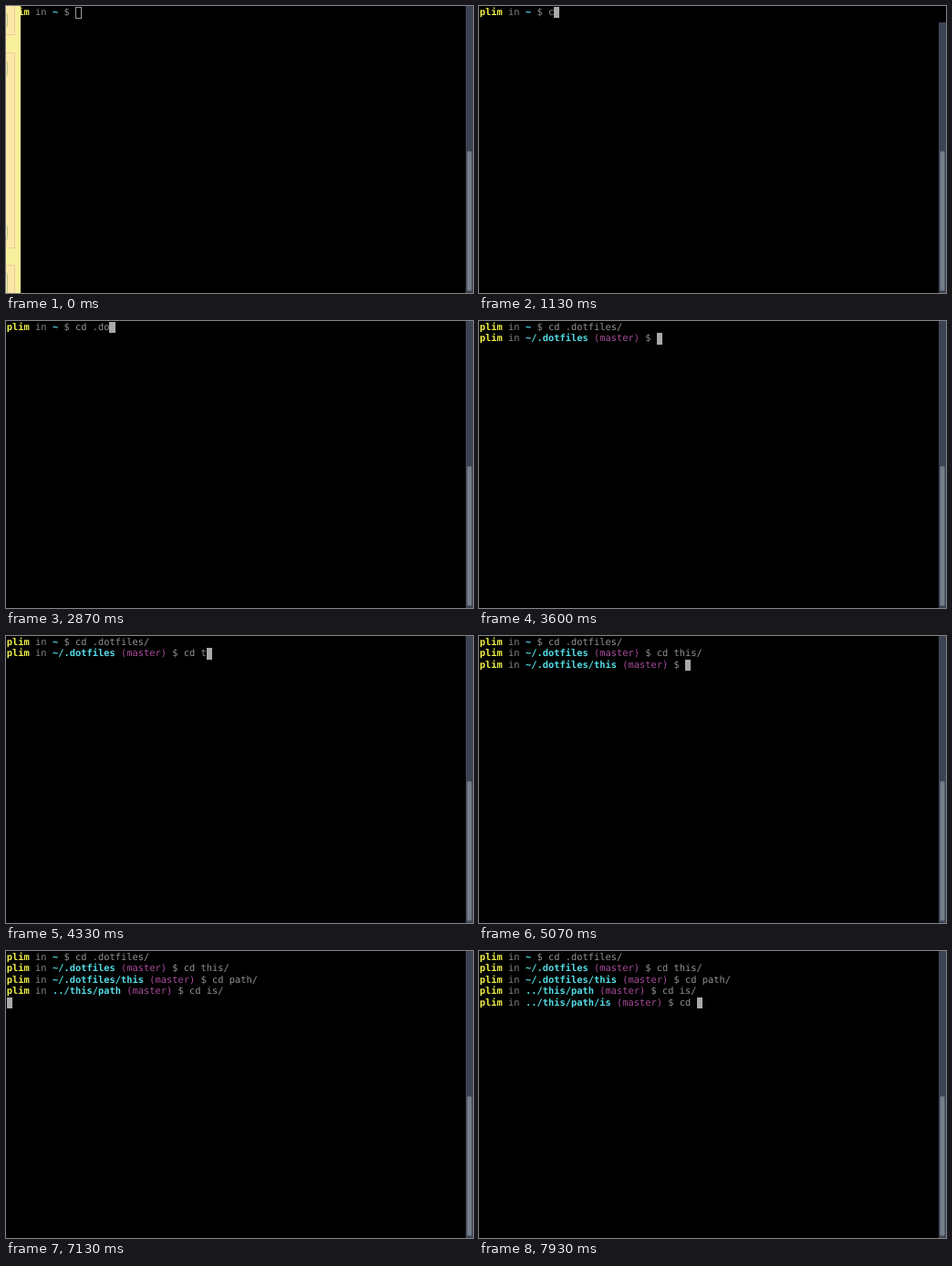
Write an HTML page that moves like this. It is 512 px wide and 315 px high and loops after 8000 ms.

```html
<!DOCTYPE html>
<html lang="en">
<head>
<meta charset="utf-8">
<title>Terminal prompt</title>
<style>
  html, body { margin: 0; width: 100%; height: 100%; overflow: hidden; background: #000; }
  #stage { position: absolute; left: 0; top: 0; width: 512px; height: 315px; overflow: hidden; background: #000; }
  #screen {
    position: absolute; left: 0.8px; top: 0.8px; margin: 0; color: #929292;
    font: 10.4px/12.55px "DejaVu Sans Mono", monospace;
    text-rendering: geometricPrecision; white-space: pre;
  }
  .row { height: 12.55px; }
  .user { color: #f0f048; font-weight: bold; }
  .in { color: #858585; }
  .path { color: #54dce6; font-weight: bold; }
  .branch { color: #aa4c9c; }
  .cursor {
    display: inline-block; box-sizing: border-box; width: 1ch; height: 12.4px;
    vertical-align: top; background: #aaa;
  }
  .unfocused .cursor { width: 7.3px; height: 13px; background: none; border: 1px solid #999; }

  #bar { position: absolute; left: 504px; top: 0; width: 8px; height: 315px; background: #3c4352; }
  #thumb {
    position: absolute; left: 1px; top: 159px; width: 6px; height: 154px; box-sizing: border-box;
    border: 1px solid #59616d; border-radius: 2px; background: #757f8c;
  }
  #shade { position: absolute; left: 470px; top: 0; width: 42px; height: 18px; background: #000; }

  #page { position: absolute; left: 0; top: 0; width: 16px; height: 315px; overflow: hidden; background: #f7f09c; }
  #page div { position: absolute; left: -20px; box-sizing: border-box; }
  .panel { width: 30px; background: #fbe8a6; border: 1px solid #f4c89c; }
  .field { width: 22px; background: #f4eba4; border: 1px solid #bcc28c; border-radius: 3px; }
</style>
</head>
<body>
<div id="stage">
  <div id="screen"></div>
  <div id="bar"><div id="thumb"></div></div>
  <div id="shade"></div>
  <div id="page">
    <div class="panel" style="top:-5px;height:37px"></div>
    <div class="panel" style="top:51px;height:215px"></div>
    <div class="panel" style="top:284px;height:40px"></div>
    <div class="field" style="top:7px;height:17px"></div>
    <div class="field" style="top:60px;height:17px"></div>
    <div class="field" style="top:240px;height:17px"></div>
    <div class="field" style="top:292px;height:30px"></div>
  </div>
</div>
<script>
const LOOP = 8000, FOCUS = 670, SHADE = [930, 2070];

// Each line: when it opens, when its prompt is printed, and the keys typed after it.
const lines = [
  { open: 0, prompt: 0, path: '~',
    keys: [[930, 'c'], [1730, 'd'], [2000, ' '], [2330, '.'], [2670, 'd'], [2870, 'o'], [3200, 'tfiles/']] },
  { open: 3470, prompt: 3540, path: '~/.dotfiles', branch: 'master',
    keys: [[3870, 'c'], [4000, 'd'], [4130, ' '], [4330, 't'], [4470, 'h'], [4670, 'is/']] },
  { open: 5000, prompt: 5065, path: '~/.dotfiles/this', branch: 'master',
    keys: [[5270, 'c'], [5330, 'd'], [5470, ' '], [5600, 'p'], [5670, 'a'], [5790, 'th/']] },
  { open: 5930, prompt: 6000, path: '../this/path', branch: 'master',
    keys: [[6270, 'c'], [6330, 'd'], [6470, ' '], [6600, 'i'], [6730, 's'], [6870, '/']] },
  { open: 7070, prompt: 7135, path: '../this/path/is', branch: 'master',
    keys: [[7540, 'c'], [7670, 'd'], [7800, ' ']] },
];

const byId = id => document.getElementById(id);
const span = (name, text = '') => `<span class="${name}">${text}</span>`;

function promptOf({ path, branch }) {
  const git = branch ? span('branch', `(${branch})`) + ' ' : '';
  return `${span('user', 'plim')} ${span('in', 'in')} ${span('path', path)} ${git}$ `;
}

function screenAt(time) {
  const shown = lines.filter(line => time >= line.open);
  return shown.map((line, i) => {
    const typed = line.keys.filter(([at]) => time >= at).map(([, text]) => text).join('');
    const text = time >= line.prompt ? promptOf(line) + typed : '';
    const cursor = i === shown.length - 1 ? span('cursor') : '';
    return `<div class="row">${text}${cursor}</div>`;
  }).join('');
}

let current = '';
function draw() {
  const time = performance.now() % LOOP;
  const html = screenAt(time);
  if (html !== current) byId('screen').innerHTML = current = html;
  const focused = time >= FOCUS;
  byId('stage').className = focused ? '' : 'unfocused';
  byId('page').hidden = focused;
  byId('shade').hidden = time < SHADE[0] || time >= SHADE[1];
  requestAnimationFrame(draw);
}
draw();
</script>
</body>
</html>
```
